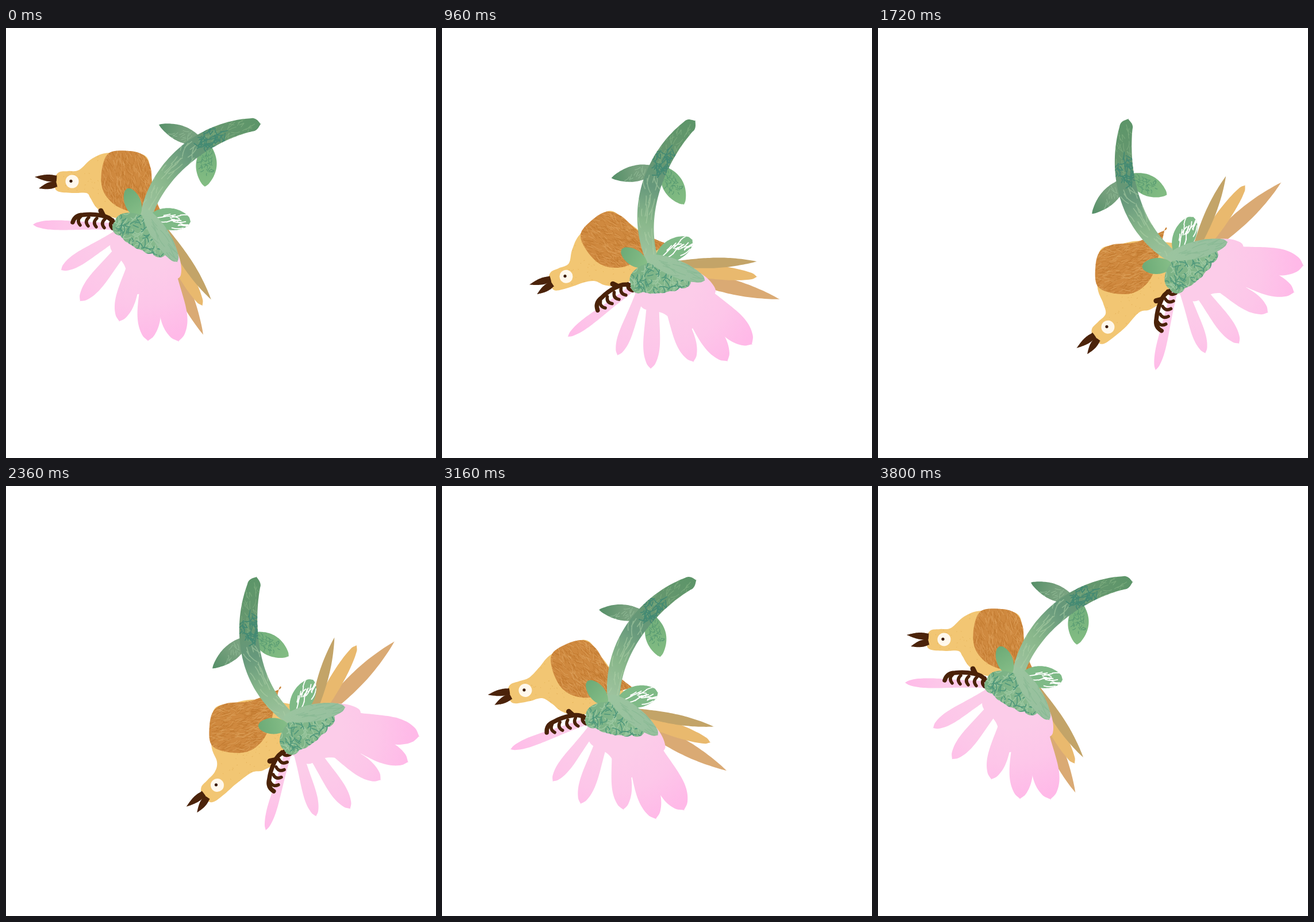
Write an HTML page with a canvas that moves like this. It is 748 px wide and 748 px high and loops after 3.84 s.

```html
<!DOCTYPE html>
<html lang="en">
<head>
<meta charset="utf-8">
<title>Swinging bird</title>
<style>
  html, body { margin: 0; width: 100%; height: 100%; overflow: hidden; background: #fff; }
  canvas { display: block; width: 748px; height: 748px; }
</style>
</head>
<body>
<canvas id="stage" width="748" height="748"></canvas>
<script>
const ctx = document.getElementById('stage').getContext('2d');
const LOOP = 3840, STEP = 40;
const PIVOT = [433, 168], CHEST = [132, 291], EYE = [115, 267], RUMP = [275, 370];
const { PI, sin, cos, hypot, min } = Math;

let seed = 7;
const rand = () => (seed = seed * 16807 % 2147483647) / 2147483647;
const mix = (a, b, t) => a.map((v, i) => v + (b[i] - v) * t);
const pts = text => text.split(', ').map(p => p.split(' ').map(Number));

// Closed smooth curve through points; a doubled point makes a corner
function smooth(p) {
  const path = new Path2D(), n = p.length, at = i => p[(i + n) % n];
  path.moveTo(...p[0]);
  for (let i = 0; i < n; i++) {
    const [a, b, c, d] = [at(i - 1), at(i), at(i + 1), at(i + 2)];
    path.bezierCurveTo(b[0] + (c[0] - a[0]) / 6, b[1] + (c[1] - a[1]) / 6,
      c[0] - (d[0] - b[0]) / 6, c[1] - (d[1] - b[1]) / 6, ...c);
  }
  path.closePath();
  return path;
}

// Band of changing half width along a spine
function ribbon(spine, width, n = 24) {
  const left = [], right = [];
  for (let i = 0; i <= n; i++) {
    const t = i / n, [x, y] = spine(t), a = spine(t - 0.01), b = spine(t + 0.01);
    const w = width(t) / hypot(b[0] - a[0], b[1] - a[1]);
    const nx = (a[1] - b[1]) * w, ny = (b[0] - a[0]) * w;
    left.push([x + nx, y + ny]);
    right.unshift([x - nx, y - ny]);
  }
  return smooth([...left, ...right]);
}

// Leaf from root a to tip b; cut trims the root, skew pushes the belly outwards
const leaf = (a, b, w, { cut = 0, skew = 1, power = 0.8 } = {}) => ribbon(
  t => mix(a, b, t),
  t => w * Math.max(0, sin(PI * (cut + (1 - cut) * t ** skew))) ** power);

// Random short strokes inside a box
function hatch(count, [x, y, w, h], angle, length, curl = 0.3) {
  const path = new Path2D(), turn = () => (rand() - 0.5) * curl * 2;
  for (let i = 0; i < count; i++) {
    const px = x + rand() * w, py = y + rand() * h, a = angle + turn(), b = a + turn();
    const l = length * (0.4 + rand() * 0.8);
    path.moveTo(px, py);
    path.quadraticCurveTo(px + cos(a) * l / 2, py + sin(a) * l / 2, px + cos(b) * l, py + sin(b) * l);
  }
  return path;
}

function linear(x0, y0, x1, y1, ...colors) {
  const g = ctx.createLinearGradient(x0, y0, x1, y1);
  colors.forEach((c, i) => g.addColorStop(i / (colors.length - 1), c));
  return g;
}

// Petals widen around the fan
const petals = pts('47 342, 96 421, 129 475, 197 510, 247 544, 300 545').map((tip, i) => {
  const root = [188 + 16.5 * i, 345 + 8 * i];
  return { root, path: leaf(root, tip, 8.5 + 3 * i, { cut: 0.2, skew: 2.6, power: 0.65 }) };
});
const web = smooth(pts('190 337, 284 372, 304 430, 263 443, 226 462, 205 411, 182 384, 186 357'));
const pink = ctx.createRadialGradient(235, 350, 70, 235, 350, 195);
['#fccce9', '#fdc6e9', '#ffb9e8'].forEach((c, i) => pink.addColorStop(i / 2, c));

const feathers = [
  { len: 177, w: 13, power: 0.9, color: '#daaa74' },
  { len: 131, w: 12, power: 0.5, color: '#e9b96e' },
  { len: 131, w: 9, power: 0.9, color: '#c3a468' }
].map((f, i) => ({
  ...f, angle: 67.4 - 8 * i, lag: 0.82 + 0.19 * i,
  path: leaf([-25, 6 - 10 * i], [f.len, 0], f.w, { cut: 0.15, skew: 1.3, power: f.power })
}));

const leafL = leaf([348, 202], [266, 168], 14);
const leafR = leaf([351, 200], [346, 276], 18, { power: 0.7 });
const bud = leaf([230, 328], [211, 279], 14, { power: 0.5 });
const scribble = leaf([251, 328], [321, 337], 19, { power: 0.5 });
const sepal = leaf([240, 315], [298, 407], 15, { power: 0.5 });
const beak = [[[88, 262], [50, 259]], [[88, 271], [57, 279]]].map(([a, b]) =>
  leaf(a, b, 6, { cut: 0.3, power: 1 }));
const wing = smooth(pts('180 217, 215 214, 240 222, 252 245, 256 285, 276 334, 276 334, 215 319, 186 305, 168 280, 167 245'));

const calyx = new Path2D();
calyx.ellipse(236, 356, 51, 28, 0.5, 0, 2 * PI);
for (let i = 0; i < 5; i++) {
  const x = 199 + 17 * i, y = 347 + 9.5 * i + 5 * sin(PI * i / 4);
  calyx.moveTo(x + 14, y);
  calyx.arc(x, y, 14, 0, 2 * PI);
}

// Bird outline, split by the part that carries it
const HEAD_TOP = pts('93 285, 85 278, 84 263, 92 251, 108 249, 127 247');
const BACK = pts('150 227, 180 217, 240 221, 252 255, 258 300');
const BELLY = pts('262 340, 215 333, 180 328, 158 313, 147 296');
const HEAD_LOW = pts('140 287, 118 287');

const tex = {
  wingDark: hatch(420, [160, 208, 118, 124], 1.35, 12, 0.4),
  wingLight: hatch(320, [160, 208, 118, 124], 1.35, 11, 0.4),
  stemLight: hatch(70, [232, 195, 110, 135], 2.2, 24),
  stemMid: hatch(45, [345, 158, 90, 45], 2.7, 15, 0.5),
  stemTeal: hatch(65, [338, 174, 48, 34], 2.4, 12, 1.1),
  leafPale: hatch(24, [280, 180, 55, 22], 2.6, 12, 0.5),
  leafTeal: hatch(45, [338, 205, 24, 48], 1.9, 7, 1.2),
  calyxPale: hatch(90, [185, 320, 105, 78], 1, 17, 1.5),
  calyxTeal: hatch(75, [190, 330, 92, 68], 0.8, 14, 1.6),
  sepalPale: hatch(30, [240, 322, 55, 75], 1, 25),
  gaps: hatch(16, [256, 320, 48, 28], 0.1, 22, 0.4),
  down: hatch(110, [90, 222, 160, 108], 1, 1.6, 3)
};

function stroke(path, color, width) {
  ctx.strokeStyle = color;
  ctx.lineWidth = width;
  ctx.stroke(path);
}
function paint(path, fill, ...layers) {
  ctx.fillStyle = fill;
  ctx.fill(path);
  ctx.save();
  ctx.clip(path);
  layers.forEach(layer => stroke(...layer));
  ctx.restore();
}
function disc(x, y, r, fill) {
  ctx.fillStyle = fill;
  ctx.beginPath();
  ctx.arc(x, y, r, 0, 2 * PI);
  ctx.fill();
}

const toes = new Path2D('M116 338Q120 325 134 325Q150 323 165 326Q180 328 187 338');
const leg = new Path2D('M169 326L165 318');
const claws = new Path2D();
for (let i = 0; i < 5; i++) {
  const x = 130 + 14 * i, y = 328 + 1.5 * i;
  claws.moveTo(x, y);
  claws.quadraticCurveTo(x - 8, y + 7, x - 1, y + 15);
}

const about = ([x, y], deg, dx = 0, dy = 0) =>
  new DOMMatrix().translate(x + dx, y + dy).rotate(deg).translate(-x, -y);
const move = (m, list) => list.map(([x, y]) => {
  const p = m.transformPoint({ x, y });
  return [p.x, p.y];
});

const soft = x => x * x * (3 - 2 * x);
const softer = x => x ** 3 * (10 - 15 * x + 6 * x * x);
// There and back, turning at the peak time
const sway = (t, peak, size, ease) => size * ease(min(t / peak, (LOOP - t) / (LOOP - peak)));

function stemPath(dx, dy) {
  const [a, b, c, d] = [[443, 167], [370, 170], [268 + dx, 226 + dy], [242 + dx, 332 + dy]];
  const spine = t => [0, 1].map(k => {
    const u = 1 - t;
    return u ** 3 * a[k] + 3 * u * u * t * b[k] + 3 * u * t * t * c[k] + t ** 3 * d[k];
  });
  return ribbon(spine, t => (10 + 6.5 * sin(PI * t)) * min(1, (t / 0.05) ** 0.5), 40);
}

function draw(time) {
  const turn = sway(time, 1950, 73, softer);
  // Loose parts trail behind the swing
  const lag = sway(time, 2350, 52.5, soft);
  const dx = -0.12 * lag, dy = -0.22 * lag;

  const base = about(PIVOT, -turn);
  const place = m => ctx.setTransform(base.multiply(m));
  const bloom = new DOMMatrix().translate(dx, dy);
  const body = about(CHEST, -lag * 0.42, -lag * 0.1);
  const head = about(EYE, turn * 0.6 - lag * 0.28, -lag * 0.63, -lag * 0.5);
  const fan = i => bloom.multiply(about(petals[i].root, -lag * 0.14 * (1 - i / 5)));

  ctx.resetTransform();
  ctx.fillStyle = '#fff';
  ctx.fillRect(0, 0, 748, 748);
  ctx.lineCap = ctx.lineJoin = 'round';

  feathers.forEach(f => {
    place(bloom.translate(...RUMP).rotate(f.angle - lag * f.lag));
    paint(f.path, f.color);
  });
  petals.forEach((p, i) => {
    place(fan(i));
    paint(p.path, pink);
  });
  place(bloom);
  paint(web, pink);

  place(new DOMMatrix());
  const belly = BELLY.map(([x, y], i) => {
    const k = lag * min(1, i / 2);
    return [x - 0.42 * k, y - 0.16 * k];
  });
  paint(smooth([...move(head, HEAD_TOP), ...move(body, BACK), ...belly, ...move(head, HEAD_LOW)]),
    '#f2c673', [tex.down, '#e4b057', 0.8]);

  place(head);
  beak.forEach(b => paint(b, '#4b230a'));
  disc(...EYE, 11.5, '#fff8ec');
  const [[px, py]] = move(base.multiply(head), [EYE]);
  ctx.resetTransform();
  disc(px - 2, py - 0.7, 2.6, '#3b1b08');

  place(body);
  paint(wing, '#cf893f', [tex.wingDark, '#c0792f', 0.8], [tex.wingLight, '#dda05a', 0.8]);

  place(fan(0));
  stroke(toes, '#4a2208', 7.5);
  stroke(leg, '#4a2208', 9);
  stroke(claws, '#4a2208', 5.5);

  place(about([348, 202], lag * 0.1, dx * 0.4, dy * 0.4));
  paint(leafL, linear(268, 170, 345, 200, '#579069', '#76a07d', '#7aa482'), [tex.leafPale, '#8fb994', 1]);
  paint(leafR, linear(345, 205, 345, 275, '#72ae7b', '#83bd83'), [tex.leafTeal, '#5b9d73', 1.2]);

  place(new DOMMatrix());
  paint(stemPath(dx, dy), linear(437, 168, 243, 325, '#5d9569', '#66976f', '#66987b', '#89b78b', '#a0c4a0'),
    [tex.stemLight, 'rgba(174,207,167,.55)', 1.6], [tex.stemMid, 'rgba(128,176,128,.7)', 1.2],
    [tex.stemTeal, '#438a73', 1.7]);

  place(bloom);
  paint(bud, linear(205, 285, 230, 325, '#6dab77', '#85bd87'));
  paint(scribble, '#7fba87', [tex.gaps, '#fff', 1.8]);
  paint(calyx, linear(190, 335, 285, 390, '#79b184', '#8bbc91'),
    [tex.calyxPale, '#9bc7a0', 1.5], [tex.calyxTeal, '#4f987b', 1.6]);
  paint(sepal, linear(240, 322, 298, 404, '#9bc49f', '#96bf9e'), [tex.sepalPale, 'rgba(130,182,143,.6)', 1.3]);
}

const start = performance.now();
function tick(now) {
  const t = Math.max(0, now - start) % LOOP;
  draw(Math.floor(t / STEP) * STEP);
  requestAnimationFrame(tick);
}
draw(0);
requestAnimationFrame(tick);
</script>
</body>
</html>
```
